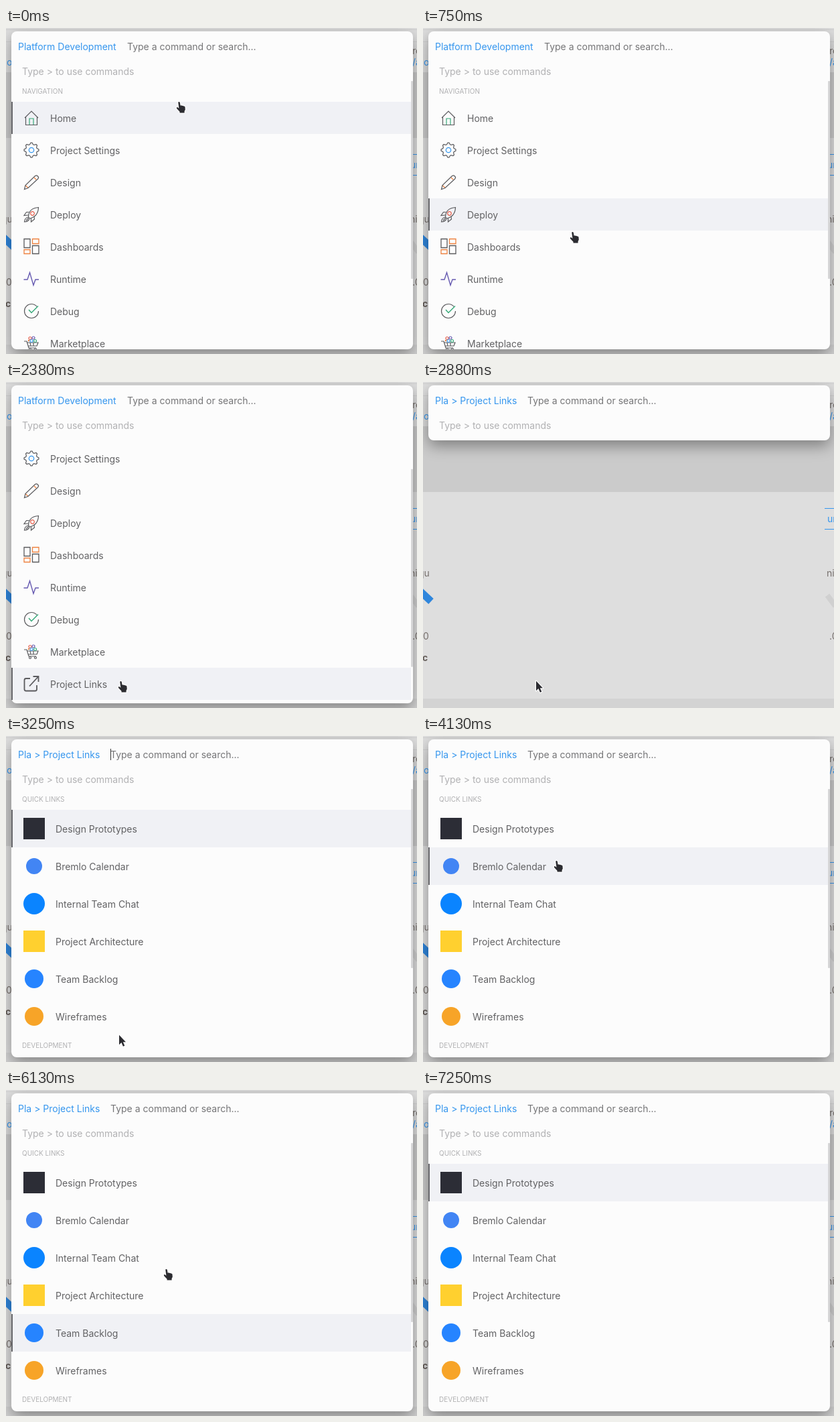
Recreate the animation shown at these times as an HTML page with a canvas. Size 614 px wide and 486 px high, loop 7370 ms.

```html
<!DOCTYPE html>
<html lang="en">
<head>
<meta charset="utf-8">
<title>Command palette</title>
<style>
  html, body { margin: 0; width: 100%; height: 100%; overflow: hidden; background: #dcdcdc; }
  canvas { display: block; }
</style>
</head>
<body>
<canvas id="stage" width="614" height="486"></canvas>
<script>
const ctx = document.getElementById('stage').getContext('2d');
const LOOP = 7370;
const PANEL = { x: 8, y: 5, w: 600, h: 474 };
const LIST_TOP = 79, ROWS_TOP = 110;
const INK = '#5b5b5e', BLUE = '#3596ee', ORANGE = '#ee8240', GREEN = '#35a878', RED = '#e5604d', PURPLE = '#6559b0';

// Steps of the pointer path: [step, x, y]
const PATH = [
  [0, 254, 109], [1, 253, 122], [3, 246, 180], [6, 219, 303], [10, 163, 425],
  [11, 142, 451], [12, 137, 463], [16, 137, 463], [17, 160, 456], [18, 180, 449],
  [19, 167, 445], [27, 167, 445], [29, 205, 330], [31, 242, 215], [33, 195, 185],
  [35, 158, 320], [37, 158, 420], [38, 170, 370], [39, 195, 255], [40, 291, 204],
  [41, 283, 240], [43, 225, 370], [45, 185, 422], [47, 200, 400], [48, 222, 350],
  [49, 235, 266], [50, 233, 140], [51, 208, 0]
];

function pointerAt(step) {
  let i = 1;
  while (i < PATH.length - 1 && PATH[i][0] < step) i++;
  const [s0, x0, y0] = PATH[i - 1], [s1, x1, y1] = PATH[i];
  const k = Math.min(1, Math.max(0, (step - s0) / (s1 - s0)));
  return { x: Math.round(x0 + (x1 - x0) * k), y: Math.round(y0 + (y1 - y0) * k) };
}

function text(str, x, y, color, size = 14, weight = 400) {
  ctx.font = `${weight} ${size}px Inter, sans-serif`;
  ctx.fillStyle = color;
  ctx.fillText(str, x, y);
}

function rect(x, y, w, h, color) {
  ctx.fillStyle = color;
  ctx.fillRect(x, y, w, h);
}

function line(points, color = INK, width = 1.2, close = false) {
  ctx.beginPath();
  for (let i = 0; i < points.length; i += 2) ctx.lineTo(points[i], points[i + 1]);
  if (close) ctx.closePath();
  ctx.strokeStyle = color;
  ctx.lineWidth = width;
  ctx.stroke();
}

function ring(x, y, r, color = INK, from = 0, to = Math.PI * 2) {
  ctx.beginPath();
  ctx.arc(x, y, r, from, to);
  ctx.strokeStyle = color;
  ctx.lineWidth = 1.2;
  ctx.stroke();
}

function path(d, color = INK, width = 1.2) {
  ctx.strokeStyle = color;
  ctx.lineWidth = width;
  ctx.stroke(new Path2D(d));
}

function dot(x, y, r, color) {
  ctx.beginPath();
  ctx.arc(x, y, r, 0, Math.PI * 2);
  ctx.fillStyle = color;
  ctx.fill();
}

// Icons are drawn around their own centre
const icons = {
  home() {
    line([-3, 10, -3, 1, 3, 1, 3, 10], GREEN);
    line([-10, 0, 0, -10, 10, 0]);
    line([-8.5, -1, -8.5, 10.5, 8.5, 10.5, 8.5, -1]);
  },
  gear() {
    const pts = [];
    for (let i = 0; i < 32; i++) {
      const a = (i - 1.5) / 32 * Math.PI * 2, r = i % 4 === 1 || i % 4 === 2 ? 11 : 8.6;
      pts.push(Math.cos(a) * r, Math.sin(a) * r);
    }
    line(pts, INK, 1.2, true);
    ring(0, 0, 3.7, BLUE);
  },
  pencil() {
    path('M4 -7 L7 -4 M-9 4.5 L-5 8.5', ORANGE);
    path('M-10.5 10.5 L-9 4.5 L5.5 -9.5 Q7.5 -11 9.5 -9 Q11.5 -7 9.8 -5.3 L-5 8.5 Z');
  },
  rocket() {
    path('M-4.5 3.5 Q-4 -9.5 10.5 -10.5 Q10 3 -2.5 6 Z');
    path('M-3.5 -3.5 L-7.5 -3.5 L-11 1.5 L-4.5 1 M4 3 L4.5 7 L-0.5 11 L-0.5 5.5');
    path('M-5 4 Q-10 5 -10.5 11 Q-4.5 10.5 -3 6.5 M-8 9 L-4 5');
    ring(1.5, -1.5, 2.8, RED);
  },
  boards() {
    const box = (x, y, w, h, c) => line([x, y, x + w, y, x + w, y + h, x, y + h], c, 1.3, true);
    box(-11, -11.5, 9, 13, INK);
    box(1.5, -11.5, 9.5, 7, ORANGE);
    box(-11, 4.5, 9, 6, ORANGE);
    box(1.5, -1.5, 9.5, 12, INK);
  },
  pulse() {
    line([-11.5, 1, -6, 1, -2.5, -9.5, 3, 9.5, 6, 1, 11, 1], PURPLE, 1.4);
  },
  check() {
    ring(0, 0, 10.5, INK, 0, Math.PI * 1.78);
    line([-4, -2, 0, 2.5, 10, -7.5], GREEN, 1.4);
  },
  cart() {
    path('M-11 -3 L-7 -3 L-4 7 L7 7 M-6 -1 L10 -1 L8 4 L-5 4 M-2 -1 L-1 4 M3 -1 L3 4');
    ring(-2, 9, 1.5);
    ring(6, 9, 1.5);
    ring(-2, -7.5, 2, RED);
    ring(3, -8, 2, PURPLE);
    ring(0, -3.5, 2, BLUE);
    ring(5.5, -3.5, 2, GREEN);
    dot(-4, -4, 1.2, ORANGE);
  },
  link() {
    path('M-2 -8 H-8 Q-10.5 -8 -10.5 -5.5 V8 Q-10.5 10.5 -8 10.5 H5.5 Q8 10.5 8 8 V2 M-3 3.5 L10 -10.5 M2.5 -11 H10.5 V-3', INK, 1.8);
  }
};

const square = c => () => rect(-16, -16, 32, 32, c);
const disc = (c, r) => () => dot(0, 0, r, c);

const NAV = {
  heading: 'NAVIGATION', rowH: 48, iconX: 38, textX: 66, thumb: 295,
  crumb: 'Platform Development', inputX: 181,
  rows: [
    ['Home', icons.home], ['Project Settings', icons.gear], ['Design', icons.pencil],
    ['Deploy', icons.rocket], ['Dashboards', icons.boards], ['Runtime', icons.pulse],
    ['Debug', icons.check], ['Marketplace', icons.cart], ['Project Links', icons.link]
  ]
};
const LINKS = {
  heading: 'QUICK LINKS', rowH: 56, iconX: 42, textX: 74, thumb: 267,
  crumb: 'Pla > Project Links', inputX: 156, next: 'DEVELOPMENT',
  rows: [
    ['Design Prototypes', square('#2c2d36')], ['Bremlo Calendar', disc('#4285f4', 12)],
    ['Internal Team Chat', disc('#0a84ff', 16)], ['Project Architecture', square('#ffd02f')],
    ['Team Backlog', disc('#2684ff', 14)], ['Wireframes', disc('#f7a428', 14)]
  ]
};

const scrollAt = step => step < 12 || step >= 23 ? 0 : step === 12 ? 20 : 68;

// The highlight follows the pointer one step late
function selectedRow(view, step) {
  const s = step > 13 && step < 17 ? 12 : Math.max(0, step - 1);
  const i = Math.floor((pointerAt(s).y + 1 + scrollAt(s) - ROWS_TOP) / view.rowH);
  return i >= 0 && i < view.rows.length ? i : 0;
}

function drawPage() {
  rect(0, 0, 614, 486, '#dedede');
  rect(0, 2, 614, 1, '#cfcfcf');
  rect(0, 20, 614, 1, '#d0d0d0');
  rect(0, 66, 614, 98, '#cbcbcb');
  rect(0, 472, 614, 14, '#d3d3d3');
  text('co', -7, 56, BLUE);
  text('qu', -7, 290, '#77706c');
  text('0', 0, 384, '#77706c');
  text('c', -1, 416, '#665f5b', 14, 700);
  line([-4, 312, 12, 327], '#2f86dc', 11);
  text('rc', 607, 39, '#77706c');
  text('/a', 607, 56, BLUE);
  rect(600, 188, 14, 1, BLUE);
  rect(600, 219, 14, 1, BLUE);
  text('ur', 604, 209, BLUE);
  text('ni', 603, 290, '#77706c');
  line([604, 318, 616, 334], '#d0d0d0', 8);
  text('.0', 607, 384, '#77706c');
}

function drawPanel(h) {
  ctx.save();
  ctx.shadowColor = 'rgba(0,0,0,.38)';
  ctx.shadowBlur = 22;
  ctx.shadowOffsetY = 8;
  ctx.beginPath();
  ctx.roundRect(PANEL.x, PANEL.y, PANEL.w, h, 8);
  ctx.fillStyle = '#fcfcfc';
  ctx.fill();
  ctx.restore();
}

function drawList(view, step) {
  const scroll = scrollAt(step), sel = selectedRow(view, step);
  ctx.save();
  ctx.beginPath();
  ctx.rect(PANEL.x, LIST_TOP, PANEL.w, PANEL.y + PANEL.h - LIST_TOP);
  ctx.clip();
  text(view.heading, 24, 98 - scroll, '#b0b0b2', 10);
  view.rows.forEach(([label, icon], i) => {
    const top = ROWS_TOP + i * view.rowH - scroll, mid = top + view.rowH / 2;
    if (i === sel) {
      rect(8, top, 597, view.rowH, '#f0f1f5');
      rect(8, top, 2, view.rowH, '#68686c');
    }
    ctx.save();
    ctx.translate(view.iconX, mid);
    icon();
    ctx.restore();
    text(label, view.textX, mid + 6, '#626264');
  });
  if (view.next) text(view.next, 24, 465, '#b0b0b2', 10);
  ctx.beginPath();
  ctx.roundRect(605, LIST_TOP + scroll * view.thumb / 395, 3, view.thumb, 1);
  ctx.fillStyle = '#d6d6d7';
  ctx.fill();
  ctx.restore();
}

const HAND = new Path2D('M3.2 1.8 Q4.6 .2 5.8 2 L6.6 6.8 Q8 5.8 9 7 Q10.3 6.2 11.3 7.5 Q12.8 7 13.5 8.8 L13.8 12.8 L12.6 15 V17.5 H5.5 V15.8 L1 11 Q.2 9 2 9 L4.4 10.8 Z');
const ARROW = new Path2D('M1 .8 V15.2 L4.4 12.1 L6.9 17.8 L9.3 16.8 L6.9 11.3 H11 Z');

function drawPointer(step) {
  if (step > 51) return;
  const p = pointerAt(step);
  const arrow = step >= 51 || (step >= 23 && step < 28);
  const shape = arrow ? ARROW : HAND;
  ctx.save();
  ctx.translate(p.x + (arrow ? 1 : 0), p.y);
  ctx.lineJoin = 'round';
  ctx.strokeStyle = '#fff';
  ctx.lineWidth = 2.4;
  ctx.stroke(shape);
  ctx.fillStyle = '#2c2c31';
  ctx.fill(shape);
  ctx.restore();
}

function draw(t) {
  const step = 2 * Math.floor(t / 250) + (t % 250 >= 130 ? 1 : 0);
  const view = step < 23 ? NAV : LINKS;
  const loading = step >= 23 && step < 26;
  drawPage();
  drawPanel(loading ? 82 : PANEL.h);
  text(view.crumb, 18, 33, BLUE);
  text('Type a command or search...', view.inputX, 33, '#757577');
  text('Type > to use commands', 24, 70, '#b1b1b3');
  if (!loading) drawList(view, step);
  const blink = Math.floor((step * 125 - 3000) / 600);
  if (step >= 24 && blink % 2 === 0) rect(156, 19, 1, 17, '#333');
  drawPointer(step);
}

const start = performance.now();
function tick() {
  draw((performance.now() - start) % LOOP);
  requestAnimationFrame(tick);
}
tick();
</script>
</body>
</html>
```
